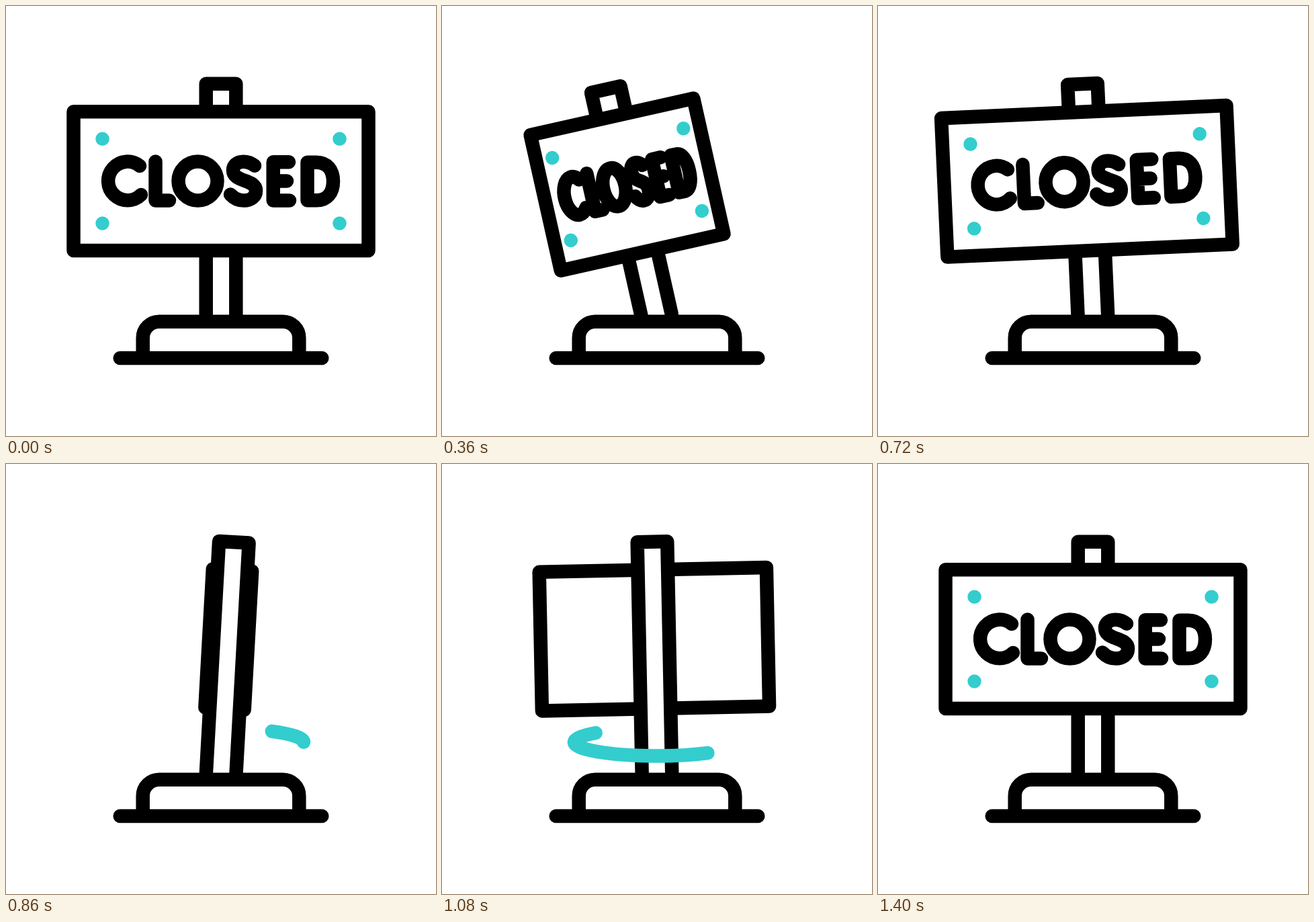
Recreate the animation shown at these times as an HTML page with a canvas. Size 640x640 px, loop 2400 ms.

```html
<!DOCTYPE html>
<html lang="en">
<head>
<meta charset="utf-8">
<title>Closed sign</title>
<style>
  html, body { margin: 0; width: 100%; height: 100%; overflow: hidden; background: #fff; }
  canvas { display: block; }
</style>
</head>
<body>
<canvas id="stage" width="640" height="640" role="img" aria-label="CLOSED"></canvas>
<script>
const ctx = document.getElementById('stage').getContext('2d');
const TEAL = '#33cdce';
const LOOP = 2400, STEP = 20;
const PIVOT = { x: 320, y: 463.5 };

const base = new Path2D('M203.7 524V494A24.3 24.3 0 0 1 228 469.7H412A24.3 24.3 0 0 1 436.3 494V524');
const floor = new Path2D('M169.7 524H470.3');
const post = new Path2D('M297.7 463.5V115.7H342.3V463.5');

// Board parts are centred on x = 0 so that they can be squeezed sideways.
const board = new Path2D('M-219.5 157.3H219.5V364H-219.5Z');
const screws = new Path2D(
  [[-176.5, 197.7], [176.5, 197.7], [-176.5, 323.5], [176.5, 323.5]]
    .map(([x, y]) => `M${x} ${y}h.01`).join(''));
const letters = new Path2D([
  'M-121 238A28.8 28.8 0 1 0 -119 281',
  'M-97.5 231.5V289.5H-77',
  'M-63.5 260.5a29 29 0 1 0 58 0a29 29 0 1 0 -58 0Z',
  'M50 237.7C45 233.5 39 231.7 33 231.7C24 231.7 18 237 18 244.5C18 253 25 256 34 259.5C44 263 52 266 52 275C52 284 44 289.5 34 289.5C26 289.5 19 286 14 280.5',
  'M101 232.2H77.7V289.5H102M77.7 260.5H98',
  'M128.5 232.7V289.3H142C158 289.3 167 278 167 261S158 232.7 142 232.7Z'
].join(''));

// Each key is [time, value]; values ease along half a cosine wave.
const tilt = [[20, 0], [466, 14.6], [881, -3.3], [1150, 2], [1400, 0]];
const turn = [[20, 1], [466, .5], [541, .5], [755, 1], [958, -1.15], [1400, 1]];
const head = [[757, -52], [1124, 232]];
const tail = [[928, -52], [1295, 232]];

function at(keys, t) {
  if (t <= keys[0][0]) return keys[0][1];
  for (let i = 1; i < keys.length; i++) {
    const [t0, v0] = keys[i - 1], [t1, v1] = keys[i];
    if (t < t1) return v0 + (v1 - v0) * (1 - Math.cos(Math.PI * (t - t0) / (t1 - t0))) / 2;
  }
  return keys[keys.length - 1][1];
}

// Squeezes the outline only, so the line weight stays constant.
function squeeze(path, s) {
  const out = new Path2D();
  out.addPath(path, new DOMMatrix([s, 0, 0, 1, PIVOT.x, 0]));
  return out;
}

function line(path, color = '#000', fill) {
  if (fill) {
    ctx.fillStyle = '#fff';
    ctx.fill(path);
  }
  ctx.strokeStyle = color;
  ctx.stroke(path);
}

function drawSign(t) {
  const s = at(turn, t);
  const panel = squeeze(board, s);
  ctx.save();
  ctx.translate(PIVOT.x, PIVOT.y);
  ctx.rotate(-at(tilt, t) * Math.PI / 180);
  ctx.translate(-PIVOT.x, -PIVOT.y);
  if (s > 0) {
    line(post, '#000', true);
    line(panel, '#000', true);
    line(squeeze(letters, s));
    line(squeeze(screws, s), TEAL);
  } else {
    line(panel, '#000', true);
    line(post, '#000', true);
  }
  ctx.restore();
}

function drawSwoosh(t) {
  const from = at(tail, t), to = at(head, t);
  if (to <= from) return;
  const arc = new Path2D();
  arc.ellipse(320, 414, 123, 20.5, 0, from * Math.PI / 180, to * Math.PI / 180);
  line(arc, TEAL);
}

function draw(now) {
  const t = Math.floor(now % LOOP / STEP) * STEP;
  ctx.clearRect(0, 0, 640, 640);
  ctx.lineWidth = 20.5;
  ctx.lineCap = ctx.lineJoin = 'round';
  drawSign(t);
  ctx.lineCap = 'butt';
  line(base);
  ctx.lineCap = 'round';
  line(floor);
  drawSwoosh(t);
}

let start;
function tick(now) {
  start ??= now;
  draw(now - start);
  requestAnimationFrame(tick);
}
draw(0);
requestAnimationFrame(tick);
</script>
</body>
</html>
```
